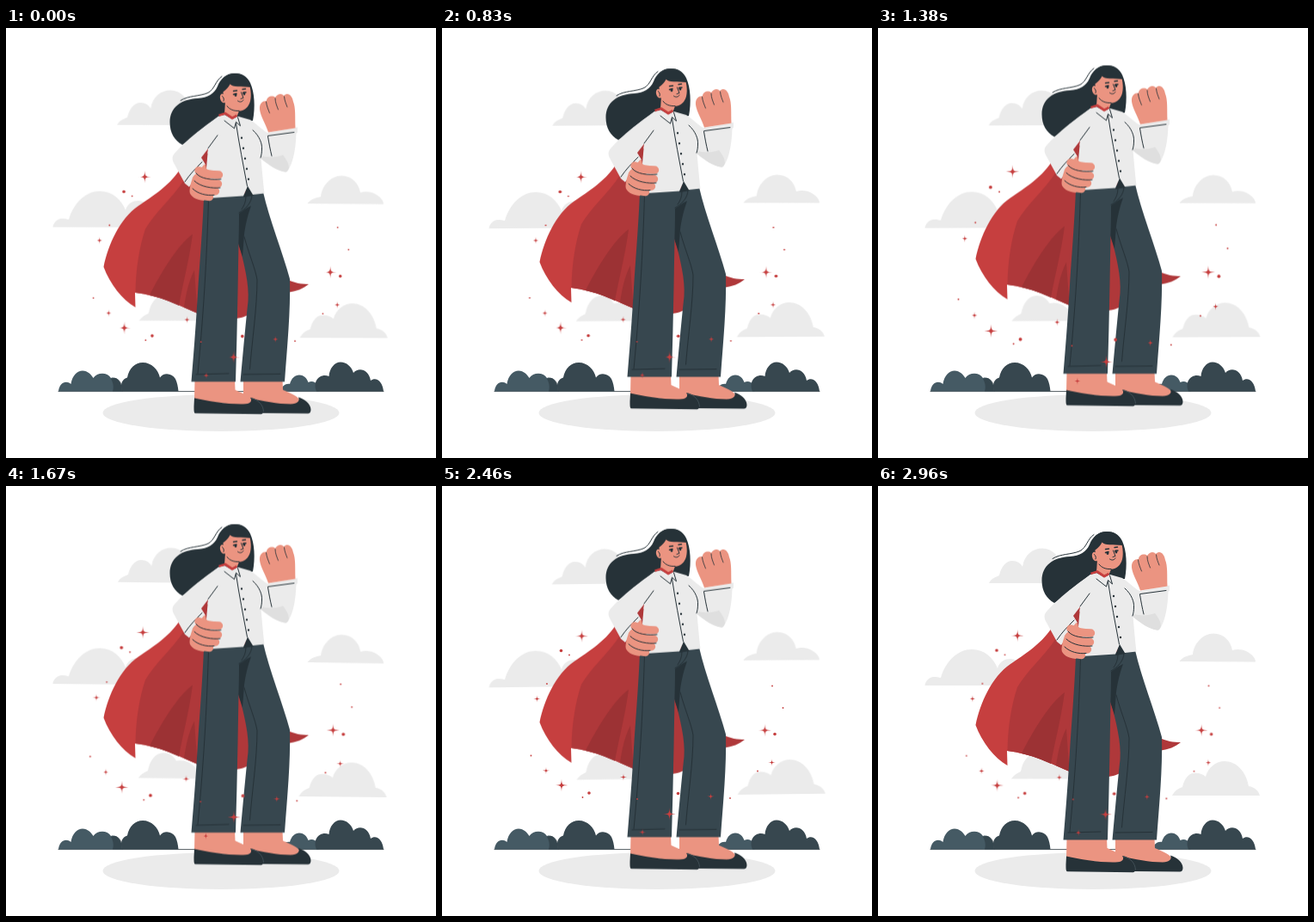
These frames come from a looping animation (500 px wide and 500 px high, 3 s). An HTML page:

```html
<!DOCTYPE html>
<html lang="en">
<head>
<meta charset="utf-8">
<title>Caped woman</title>
<style>
  html, body { margin: 0; width: 100%; height: 100%; overflow: hidden; background: #fff; }
  svg { display: block; width: 100%; height: 100%; }

  .clouds, .hero, .sparks { animation: 3s linear -45ms infinite; }
  .clouds { animation-name: wind; animation-duration: 1.5s; transform-origin: 250px 216px; }
  .hero { animation-name: float; }
  .sparks { animation-name: beat; animation-delay: -60ms; transform-origin: 250.5px 285px; }

  @keyframes wind { 25% { transform: rotate(1deg); } 75% { transform: rotate(-1deg); } }
  @keyframes float { 50% { transform: translateY(-10px); } }
  @keyframes beat {
    0%, 28%, 70%, 100% { transform: scale(1); }
    14%, 42% { transform: scale(1.087); }
  }

  .pale { fill: #ebebeb; }
  .shade { fill: #dbdbdb; }
  .ink { fill: #263238; }
  .slate { fill: #37474f; }
  .mist { fill: #455a64; }
  .skin { fill: #eb9481; }
  .red { fill: #c63f3f; }
  .red2 { fill: #af383a; }
  .red3 { fill: #9c3234; }
  .line { fill: none; stroke: #263238; stroke-width: 1; stroke-linecap: round; stroke-linejoin: round; }
  .thin { stroke-width: .8; }
  .bold { stroke-width: 1.4; }
  .fingers { fill: none; stroke: #eb9481; stroke-width: 9.4; stroke-linecap: round; }
  .collar { fill: none; stroke: #c63f3f; stroke-width: 2.8; }
</style>
</head>
<body>
<svg viewBox="0 0 500 500" xmlns="http://www.w3.org/2000/svg">
  <defs>
    <path id="star" d="M0-1C.05-.1 .1-.05 1 0C.1 .05 .05 .1 0 1C-.05 .1-.1 .05-1 0C-.1-.05-.05-.1 0-1Z"/>
  </defs>

  <g class="clouds pale">
    <path d="M129 113C132 107 137 106 141 104C143 94 149 87 156 87C162 87 166 90 168 94C170 80 180 72.500 191 72.500C203 72.500 211 82 214 94C222 98 228 106 230 113Z"/>
    <path d="M54.500 232C55 227 59 223 64 222C68 222 71 222.500 73 223C79 203 93 190 109 190C124 190 134 200 139 212C141 204 148 201 154 201C165 201 175 215 178 232Z"/>
    <path d="M350.500 204C354 199 360 197 366 196C367 183 378 171.500 390 171.500C402 171.500 410 180 412 191C418 189 425 190 430 193C435 196 439 200 439 204.500Z"/>
    <path d="M342 360C345 354 349 352 354 350C356 341 361 334 367 334C372 333 378 335 381 338C384 327 393 320 403 320C417 320 428 332 431 349C438 350 443 355 444 360Z"/>
    <path d="M155 340.500C158 336 162 334 166 332C168 321 174 311 184 311C192 311 197 316 199 320C207 318 215 321 221 327L225 340.500Z"/>
  </g>

  <ellipse class="pale" cx="250" cy="447.500" rx="137.500" ry="21.500"/>

  <g>
    <path class="line thin" d="M61 422.600H439"/>
    <path class="mist" d="M61 422.500C62 412 70 409 75.500 414C77 404 83 398.500 89 398.500C95 398.500 99 403 101.500 407C106 400 118 400 122 407C129 405 135 411 135 422.500Z"/>
    <path class="ink" opacity=".5" d="M122 408C130 404 136 412 136 422.500H124C126 417 124 411 122 408Z"/>
    <path class="slate" d="M135 422.500C132 413 136 408 141 406.500C143 396 150 389 159 389C169 389 177 397 179 406.500C183 400 193 401 197 408C199 412 200 417 200.500 422.500Z"/>
    <path class="mist" d="M320 422.500C320 416 326 413 330 414C332 407 336 403.500 341 403.500C347 403.500 350 408 351.500 412C357 409 363 412 364 422.500Z"/>
    <path class="slate" d="M361 422.500C356 411 365 401 375.500 405C376 396 382 388.500 389 388.500C396 388.500 402 394 404 401C410 394 422 397 424 410C431 405 438 412 439 422.500Z"/>
  </g>

  <g class="hero">
    <!-- cape -->
    <path class="red" d="M205 160C192 183 170 196 154 207C132 222 119 252 113.500 278C121 298 135 316 150.500 325L150 308C178 311 200 322 225 333L240 150Z"/>
    <path class="red2" d="M207 177C195 196 172 216 162 234C155 255 151 280 150.500 308C178 311 200 322 225 333L268 338C276 337 282 334 286 331L290 200L240 140Z"/>
    <path class="red3" d="M217 240C200 252 180 285 167 311C180 314 190 318 201 323C205 300 213 270 217 240Z"/>
    <path class="red3" d="M219 282C212 295 209 312 207 325L223 332C221 315 220 295 219 282Z"/>
    <path class="red2" d="M326 292C335 297 344 298 352 298C346 303 338 307 326 307.500Z"/>

    <!-- feet -->
    <path class="skin" d="M276 409H321.500L322 421C331 425 341 429 341 433C341 438 331 439 320 438L276 432Z"/>
    <path class="ink" d="M281 430.500C300 434 315 437.500 331 437.500C339 437 342 434 340 429.500C347 432 354.500 437 354.500 444C354.500 447 353 448.500 351 448.500L296 448Z"/>
    <path class="skin" d="M219.500 409H266L266.500 421C275 425 285.500 429 286 433C286 438 275 439 265 438L219 433Z"/>
    <path class="ink" d="M219 430.500C235 434 258 438 276 437.500C284 437.500 287 434 284 430C291 431 299.500 436 299.500 444C299.500 448 298 449.300 296 449.300L220 448.300C218.500 448 218.500 445 218.500 440Z"/>
    <path class="line" style="stroke:#5b6a72;stroke-width:.5" d="M285 431C293 432 299 438 299.500 446"/>

    <!-- trousers -->
    <path class="slate" d="M262 194L299 191C306 222 322 262 330 292C331 330 327 370 324 411.500H272.500C275 385 278 350 281.500 318C283 298 277 275 270.500 250L268 215Z"/>
    <path class="ink" d="M271 214L285 207C280 220 277 236 276.500 246L275 266L270 251Z"/>
    <path class="slate" d="M230 197L278 194L287 193C288 205 277 212 271 216C270 280 269 345 267 411.500H215.500C219 370 221.500 335 223.500 300C226 265 229 225 230 197Z"/>
    <path class="line" d="M235.500 200C234 250 231 320 223 402M221 403L259 402M276 403L319 402.500M277 243C283 265 290 280 292 293C292 325 286 365 283.500 397M286 194C286 204 278 211 271 215M279 196C279 202 277 207 274 211"/>
    <path class="ink" d="M281 182L288 195L276 197Z"/>

    <!-- hair behind the face -->
    <path class="ink" d="M266 53C256 53 249 60 246 68C242 77 235 81 223 82C204 83 190.500 92 190.500 110C190.500 122 196 131 205 136L250 108L287 108C290 92 289 75 284 64C280 56 274 53 266 53Z"/>
    <path class="line" d="M203 84.500C212 78.500 225 80 235 75.500C243 71 243 62 251 56.500"/>

    <!-- shirt -->
    <path class="pale" d="M247 103L254 101L263 106L270 103L284 107C292 112 298 119 304 122L339 115.500L339 121.500L337.500 123C337 140 334 155 330 162C328 166 327 168 324 167.500C315 166 306 160 296.500 152C298 168 299 180 300.500 192.500L287 194L281 184L276 195.500L230 198.500C232 180 233 160 235 141L222 122Z"/>
    <path class="shade" d="M297 149C305 151 314 151 322 148C326 153 329 158 329 163C327 168 326 168 324 167.500C315 166 306 160 296.500 152Z" opacity=".75"/>
    <path class="pale" d="M247 103C230 115 210 130 196 146C193 149 193 153 195 157L208 181L213 185L232 159L228 152L247 124L250 110Z"/>
    <path class="red2" d="M235 140.500L227 151L232.500 159Z"/>
    <path class="line" d="M246 125L235 140M208 179C214 170 221 163 228 156M287 119C295 126 298 135 297.500 141C297.500 145 297 148 296 151M305 125.500L335 121.500M304.500 126C306 135 307 141 309 149"/>

    <!-- neck, face, fringe -->
    <path class="skin" d="M255 86L254 100L263 106L269 102L272 94Z"/>
    <path class="skin" d="M252 72L259 64L283 66C285.500 75 285.500 85 282 90C279 96 272 97.500 267 96.500C261 95 256 91 254 86Z"/>
    <ellipse class="skin" cx="252.300" cy="82" rx="3.300" ry="5.400" transform="rotate(-15 252.300 82)"/>
    <path class="ink" d="M266 53C252 53 246 64 248.500 79C251 74 257 73 260.500 65.500C263 69 274 68 284.500 69C283 59 276 53 266 53Z"/>
    <g class="ink">
      <ellipse cx="267" cy="78" rx="1.500" ry="2"/>
      <ellipse cx="277" cy="76.500" rx="1.400" ry="1.900"/>
    </g>
    <path class="line bold" d="M264.500 73.500L268.500 73M275 71.500L278.500 71M264.500 77.500L268 76.500M275.500 75.500L279 75"/>
    <path class="line" d="M273.500 75L276 81.500L273 82.500M269.500 85C272 87 275 86 276 84M251.500 79.500C253 81 254 83 253 85M257 91C260 95 265 97 271 96.500"/>

    <!-- collar and buttons -->
    <path class="collar" d="M247.500 102L255 99.500L263 105L268.500 102"/>
    <path class="pale" d="M248 103L254 102L263 107L267 109L265.500 117Z"/>
    <path class="pale" d="M264 107L269.500 103L273 114L268 109.500Z"/>
    <path class="line" d="M254 108L265.500 117L267.500 109.500L272.500 114L269.500 104M267.500 111C271 135 276 160 280.500 184"/>
    <g class="ink">
      <circle cx="274" cy="128" r="1.200"/><circle cx="276" cy="140" r="1.200"/><circle cx="278" cy="152" r="1.200"/><circle cx="280" cy="164" r="1.200"/><circle cx="282" cy="176" r="1.200"/>
    </g>

    <!-- hands -->
    <path class="skin" d="M231 158.500C234 161 231 164 236 166L240 190L230 201C221 200 213.500 196 213.500 190C214 182 216 178 217 174Z"/>
    <path class="fingers" d="M224 166C232 170 240 171 247.500 171M222 175C230 181 240 181 246.500 181.500M222 184C230 189 238 190 243.500 190M221 191C227 195 232 196 236.500 196.500"/>
    <path class="line" d="M221 169C226 176 240 177 250 176M219 178C226 185 240 187 249 186M217 187C223 193 233 195.500 242 194.500"/>
    <path class="skin" d="M305 121.500C302 112 296 103 295 95C294.500 88 298 85 303 85C303 80 310 78 313 81C316 76 321 76 323 79C328 74 333 79 334 86C337 93 336 105 336.500 116.500Z"/>
    <path class="line thin" d="M302.500 86C303 91 305 95 306.500 99M313 82C313 87 315 91 316.500 95M323.500 80C324 85 325.500 88 327 92"/>
  </g>

  <g class="sparks red"></g>
</svg>
<script>
  const sparks = document.querySelector('.sparks');
  // radius, then x and y pairs
  const stars = [
    [7.2, 162.5, 174.5, 375.5, 284, 139, 348, 264.5, 381.5],
    [4.2, 110.5, 247.5, 121, 331, 211, 338.5, 312.5, 361, 383.5, 321.5, 233, 402.5]
  ];
  const dots = [
    [1.8, 138.5, 191.5, 387, 288.5, 171, 357, 274.5, 357.5],
    [0.9, 148, 196.5, 122, 230, 103.5, 313.5, 163.5, 362, 227, 364, 335, 363, 367, 331.5, 396.5, 258, 384, 232.5]
  ];
  const place = (sets, draw) => sets.map(([r, ...p]) => {
    let out = '';
    for (let i = 0; i < p.length; i += 2) out += draw(r, p[i], p[i + 1]);
    return out;
  }).join('');

  sparks.innerHTML =
    place(stars, (r, x, y) => `<use href="#star" transform="translate(${x} ${y}) scale(${r})"/>`) +
    place(dots, (r, x, y) => `<circle cx="${x}" cy="${y}" r="${r}"/>`);
</script>
</body>
</html>
```
